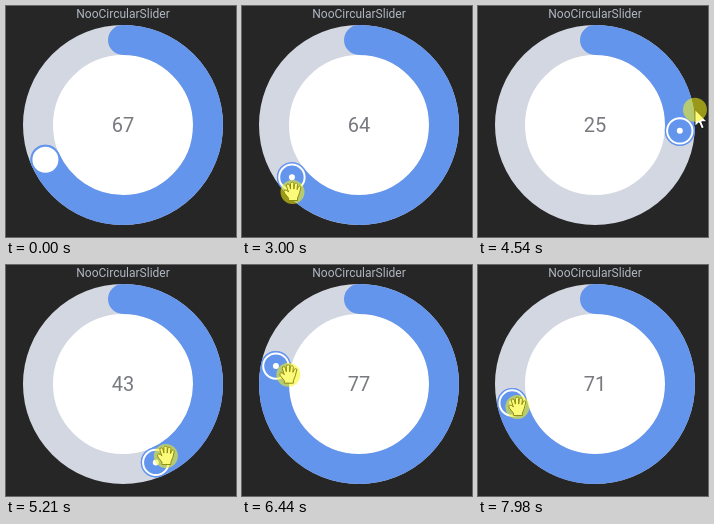
Write an HTML page with a canvas that moves like this. It is 230 by 231 pixels and loops after 8 s.

```html
<!DOCTYPE html>
<html lang="en">
<head>
<meta charset="utf-8">
<title>Circular slider</title>
<style>
  html, body { margin: 0; width: 100%; height: 100%; overflow: hidden; background: #262626; }
  canvas { display: block; }
</style>
</head>
<body>
<canvas id="stage" width="230" height="231"></canvas>
<script>
const ctx = document.getElementById('stage').getContext('2d', { alpha: false });
const LOOP = 8000, PRESS = 2440;
const CX = 117, CY = 119, RADIUS = 85, WIDTH = 30, OUTER = RADIUS + WIDTH / 2;
const BLUE = '#6495ed', TRACK = '#d3d7e1', WHITE = '#fff', BACK = '#262626';

const linear = k => k;
const smooth = k => k * k * (3 - 2 * k);
const easeOut = power => k => 1 - (1 - k) ** power;
const settle = easeOut(4);

// percent: handle position; lag: how far the pointer trails it; reach: pointer distance from the centre
const start = { percent: 68.3, lag: 6.2, reach: 175 };
const moves = [
  { from: 860, to: 1580, lag: -.5, reach: 102.7 },
  { from: 1680, to: 2190, lag: .2, reach: 86 },
  { from: 2650, to: 4540, percent: 26.1, lag: 3.5, reach: 101.1, ease: smooth },
  { from: 4750, to: 7160, percent: 87.2, lag: 1.3, reach: 71, ease: easeOut(1.6) },
  { from: 7360, to: 7980, percent: 71.4, lag: 1, reach: 81, ease: linear }
];

const arrow = new Path2D('M0 0V16.5L4 13 6.6 19 9.3 17.8 6.8 12H12Z');
const hand = new Path2D(
  'M-4 9V7L-8 2Q-9.5-.5-7.5-1T-4 1L-6-5Q-6.3-7.5-4.5-7.2T-2.8-5L-2-2V-7.5' +
  'Q-1.5-9 0-9T1.3-7.5V-2L2-7Q3-8.5 4-8T5-6.5L4.5-1.5 6-4.5Q7.5-6 8.5-4.5L7 2 5 7V9Z');

const mix = (a, b, k) => a + (b - a) * k;

function stateAt(t) {
  const state = { ...start };
  for (const { from, to, percent = state.percent, lag, reach, ease = linear } of moves) {
    const k = Math.min(1, Math.max(0, (t - from) / (to - from)));
    state.percent = mix(state.percent, percent, ease(k));
    state.lag = mix(state.lag, lag, settle(k));
    state.reach = mix(state.reach, reach, settle(k));
  }
  return state;
}

const angleOf = percent => percent / 50 * Math.PI - Math.PI / 2;

function polar(percent, r) {
  const a = angleOf(percent);
  return [CX + r * Math.cos(a), CY + r * Math.sin(a)];
}

function circle(x, y, r, fill, stroke, width) {
  ctx.beginPath();
  ctx.arc(x, y, r, 0, 2 * Math.PI);
  if (fill) { ctx.fillStyle = fill; ctx.fill(); }
  if (stroke) { ctx.strokeStyle = stroke; ctx.lineWidth = width; ctx.stroke(); }
}

function label(text, y, size, color) {
  ctx.font = `${size}px Roboto, sans-serif`;
  ctx.textAlign = 'center';
  ctx.fillStyle = color;
  ctx.fillText(text, CX, y);
}

function drawHandle(x, y, active) {
  if (!active) return circle(x, y, 14, WHITE, BLUE, 2);
  circle(x, y, 15, BLUE);
  circle(x, y, 12.7, null, WHITE, 2);
  circle(x, y, 3, WHITE);
}

function drawPointer(x, y, overSlider, pressed) {
  const shape = overSlider ? hand : arrow;
  ctx.save();
  ctx.translate(x, overSlider ? y - 1 : y);
  ctx.fillStyle = WHITE;
  ctx.strokeStyle = '#111';
  ctx.lineWidth = 1;
  ctx.lineJoin = 'round';
  ctx.fill(shape);
  ctx.stroke(shape);
  ctx.restore();
  // The click highlight tints the pointer as well
  if (pressed) circle(x, y, 12, 'rgba(250, 245, 15, .55)');
}

function draw(now) {
  const t = now % LOOP;
  const { percent, lag, reach } = stateAt(t);
  const pressed = t >= PRESS;

  ctx.fillStyle = BACK;
  ctx.fillRect(0, 0, 230, 231);
  label('NooCircularSlider', 12, 12, '#b0b7c2');

  circle(CX, CY, RADIUS, WHITE, TRACK, WIDTH);
  ctx.beginPath();
  ctx.arc(CX, CY, RADIUS, angleOf(0), angleOf(percent));
  ctx.strokeStyle = BLUE;
  ctx.lineCap = 'round';
  ctx.stroke();

  label(Math.floor(percent - .4), 126, 20, '#787a7f');
  drawHandle(...polar(percent, RADIUS), pressed);
  drawPointer(...polar(percent - lag, reach), reach < OUTER, pressed);
  requestAnimationFrame(draw);
}
requestAnimationFrame(draw);
</script>
</body>
</html>
```
